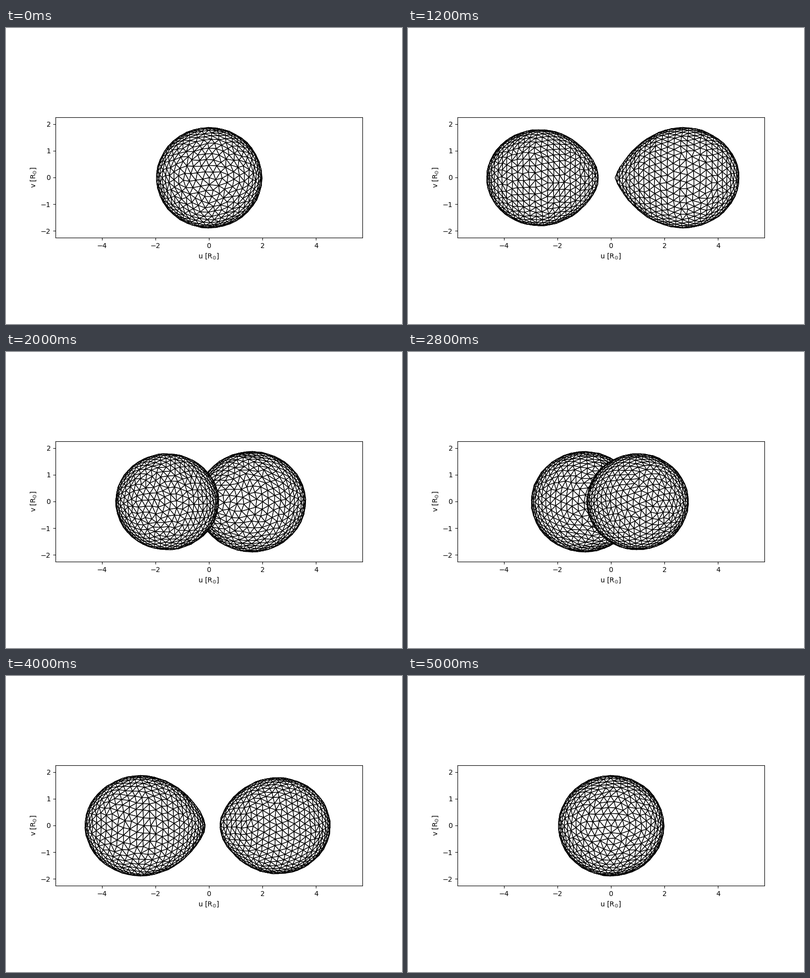
A matplotlib script that plays this animation: 800x600 px, repeating every 5.1 s.

```python
"""Two tidally distorted stars in a close orbit, drawn as triangle meshes."""
import numpy as np
import matplotlib.pyplot as plt
from matplotlib.animation import FuncAnimation
from matplotlib.collections import PolyCollection
from matplotlib.tri import Triangulation

SEPARATION = 5.3       # distance between the stars, solar radii
STEPS = 50             # frames per orbit
TRIANGLES = 1500       # approximate mesh size of each star


def surface_radius(dirs, potential):
    """Radius of the equal-mass Roche surface along unit vectors, by Newton."""
    x, z = dirs[:, 0], dirs[:, 2]
    spin = 1 - z**2
    r = np.full(len(dirs), 0.25)
    for _ in range(14):
        dist = np.sqrt(1 - 2 * x * r + r**2)
        value = 1 / r + 1 / dist - x * r + spin * r**2 - potential
        slope = -1 / r**2 + (x - r) / dist**3 - x + 2 * spin * r
        r = r - value / slope
    return r


def onto_surface(points, potential):
    dirs = points / np.linalg.norm(points, axis=1)[:, None]
    return dirs * surface_radius(dirs, potential)[:, None]


def ring_points(potential, rng):
    """Loosely spaced rings of points from the far side to the inner tip."""
    theta = np.linspace(np.pi, 0, 600)
    side = np.sin(theta) / np.sqrt(2)
    profile = onto_surface(np.column_stack([np.cos(theta), side, side]), potential)
    rho = np.hypot(profile[:, 1], profile[:, 2])
    step = np.hypot(np.diff(profile[:, 0]), np.diff(rho))
    arc = np.concatenate([[0], np.cumsum(step)])
    area = np.sum(np.pi * (rho[1:] + rho[:-1]) * step)
    edge = np.sqrt(area / TRIANGLES * 4 / np.sqrt(3))

    rings = round(arc[-1] / (edge * np.sqrt(3) / 2))
    points = [[-1.0, 0.0, 0.0]]
    for s in np.linspace(0, arc[-1], rings + 1)[1:-1]:
        t = np.interp(s, arc, theta)
        count = max(5, round(2 * np.pi * np.interp(s, arc, rho) / edge))
        start = rng.uniform(0, 2 * np.pi)
        for phi in start + 2 * np.pi * np.arange(count) / count:
            points.append([np.cos(t), np.sin(t) * np.cos(phi), np.sin(t) * np.sin(phi)])
    points.append([1.0, 0.0, 0.0])
    points = onto_surface(np.array(points), potential)
    points[1:-1] += rng.normal(0, 0.14 * edge, points[1:-1].shape)
    return onto_surface(points, potential), edge


def relax(points, edge, potential, rounds=9):
    """Push close neighbours apart; both end points stay where they are."""
    for _ in range(rounds):
        gap = points[:, None] - points[None]
        dist = np.linalg.norm(gap, axis=2)
        np.fill_diagonal(dist, np.inf)
        push = np.clip(1.3 - dist / edge, 0, None) / dist
        shift = 0.15 * edge * (gap * push[:, :, None]).sum(axis=1)
        shift[[0, -1]] = 0
        points = onto_surface(points + shift, potential)
    return points


def triangulate(points):
    """Spherical Delaunay mesh through stereographic projection from the tip."""
    dirs = points / np.linalg.norm(points, axis=1)[:, None]
    flat = dirs[:-1, 1:] / (1 - dirs[:-1, :1])
    mesh = Triangulation(flat[:, 0], flat[:, 1])
    tip = len(points) - 1
    fan = [[mesh.triangles[t, i], mesh.triangles[t, (i + 1) % 3], tip]
           for t, i in np.argwhere(mesh.neighbors == -1)]
    faces = points[np.vstack([mesh.triangles, fan])]
    normal = np.cross(faces[:, 1] - faces[:, 0], faces[:, 2] - faces[:, 0])
    inward = np.sum(normal * faces.mean(axis=1), axis=1) < 0
    faces[inward] = faces[inward][:, ::-1]
    return faces


def make_star(potential, seed):
    points, edge = ring_points(potential, np.random.default_rng(seed))
    return SEPARATION * triangulate(relax(points, edge, potential))


def visible_faces(star, angle):
    """Project a star at an orbit angle and keep the faces towards the viewer."""
    s, c = np.sin(angle), np.cos(angle)
    x, y, z = np.moveaxis(star, 2, 0)
    u = s * (SEPARATION / 2 - x) - c * y
    w = c * (SEPARATION / 2 - x) + s * y
    area = ((u[:, 1] - u[:, 0]) * (z[:, 2] - z[:, 0])
            - (u[:, 2] - u[:, 0]) * (z[:, 1] - z[:, 0]))
    shown = np.flatnonzero(area > 0)
    shown = shown[np.argsort(w[shown].mean(axis=1))]
    return np.stack([u[shown], z[shown]], axis=2)


large = make_star(3.7643, 4)
small = make_star(3.89, 9)

fig, ax = plt.subplots(figsize=(8, 6), dpi=100)
ax.set_aspect("equal")
ax.set_xlim(-5.731, 5.731)
ax.set_ylim(-2.255, 2.255)
ax.set_xticks([-4, -2, 0, 2, 4])
ax.set_yticks([-2, -1, 0, 1, 2])
ax.set_xlabel(r"u [$\mathrm{R_{\odot}}$]")
ax.set_ylabel(r"v [$\mathrm{R_{\odot}}$]")
faces = PolyCollection([], facecolors="white", edgecolors="black",
                       linewidths=1, snap=True)
ax.add_collection(faces, autolim=False)


def draw(frame):
    angle = 2 * np.pi * frame / STEPS
    layers = [visible_faces(large, angle), visible_faces(small, angle + np.pi)]
    if np.cos(angle) > 0:
        layers.reverse()
    faces.set_verts(np.concatenate(layers))
    return [faces]


anim = FuncAnimation(fig, draw, frames=STEPS + 1, interval=100, repeat=True)
plt.show()
```
